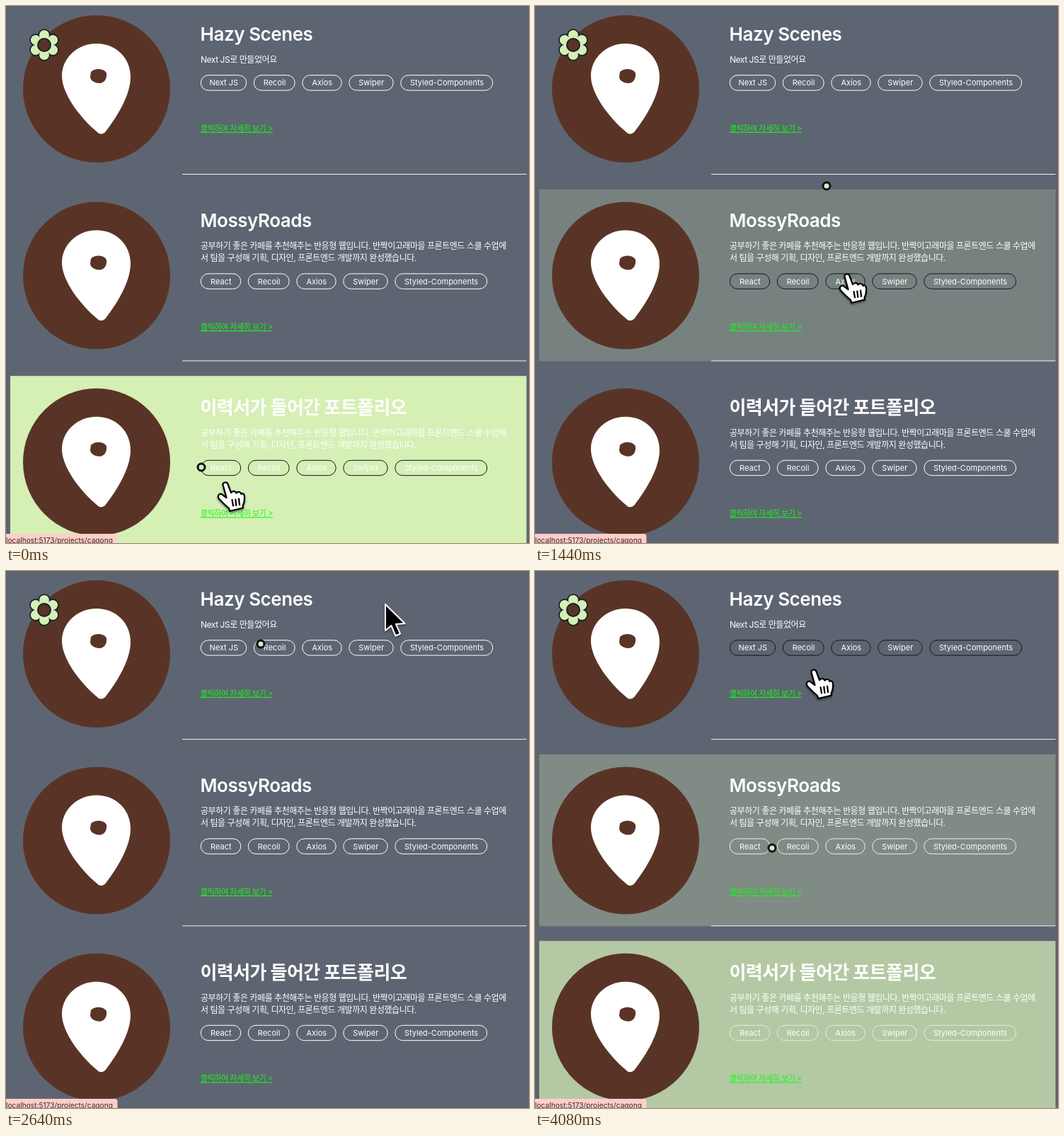
An HTML page that plays this animation: 739 by 758 pixels, repeating every 4.16 s.

```html
<!DOCTYPE html>
<html lang="ko">
<head>
<meta charset="utf-8">
<title>Projects</title>
<style>
  html, body { margin: 0; width: 100%; height: 100%; overflow: hidden; background: #5e6572; }
  svg { display: block; width: 100%; height: 100%; }
  text { font-family: Inter, "Noto Sans CJK KR", "Noto Sans CJK", sans-serif; fill: #fff; white-space: pre; }
  .title { font-size: 26px; font-weight: 600; letter-spacing: -.45px; }
  .title.ko { font-weight: 700; letter-spacing: -.55px; }
  .desc { font-size: 12px; letter-spacing: -.45px; }
  .tag { font-size: 11px; text-anchor: middle; }
  .link { font-size: 11px; letter-spacing: -.45px; fill: #16f816; text-decoration: underline; }
  .status { font-size: 10.2px; fill: #40292a; }
</style>
</head>
<body>
<svg viewBox="0 0 739 758">
  <defs>
    <filter id="shadow" x="-30%" y="-30%" width="170%" height="170%">
      <feDropShadow dx="0" dy="2" stdDeviation="1.5" flood-opacity=".45"/>
    </filter>
    <g id="badge">
      <circle cx="128" cy="117" r="104" fill="#593426"/>
      <path fill="#fff" d="M128 53C100 53 79 74 79 99C79 124 105 158 129 178C133 182 138 181 141 177C158 155 176 125 176 100C176 73 155 53 128 53Z"/>
      <path fill="#593426" d="M120 93C126 87 139 88 142 95C143 102 139 109 132 109C127 109 119 106 119 100Z"/>
    </g>
  </defs>
  <rect width="739" height="758" fill="#5e6572"/>
  <g id="rows"></g>
  <g id="flower" transform="translate(54 55)"></g>
  <path d="M0 745H153.500Q157.500 745 157.500 749V758H0Z" fill="#fdcfcb"/>
  <text class="status" x="0" y="757.500">localhost:5173/projects/cagong</text>
  <circle id="follower" r="5" fill="#d5efb5" stroke="#0b1016" stroke-width="3"/>
  <g id="hand" filter="url(#shadow)" stroke="#000" stroke-width="2.200" stroke-linejoin="round" stroke-linecap="round">
    <path fill="#fff" d="M-3.500 3C-4-1 2-2 3.500 2L8 14C10 11 14 11 15.500 14.500C18 11.500 22 13 22.500 16C25 14 27 16 27 20C27.500 27 26 30 24.500 33L25 35.500L6 40L5 36C0 32-4 28-9.500 22C-12 17-7 14-4 17L1.500 21Z"/>
    <path fill="none" d="M9.500 24L11 32.500M14.300 23.500L15.300 32M19 22.500L20 31"/>
  </g>
  <path id="arrow" filter="url(#shadow)" fill="#000" stroke="#fff" stroke-width="2" stroke-linejoin="round"
    d="M0 1V38L8.500 31L14.500 45.500L21 42.500L15 29L27.500 28Z"/>
</svg>
<script>
const LOOP = 4160, STEP = 80, FADE = 500;
const SAMPLE = 40;  // pointer polling interval
const LAG = 60;     // the ring trails the pointer
const PITCH = 263.4, LINE = 16.8;
const NS = 'http://www.w3.org/2000/svg';
const byId = id => document.getElementById(id);

function add(parent, tag, attrs, content) {
  const node = document.createElementNS(NS, tag);
  for (const key in attrs) node.setAttribute(key, attrs[key]);
  if (content) node.textContent = content;
  return parent.appendChild(node);
}

const LONG_DESC = [
  '공부하기 좋은 카페를 추천해주는 반응형 웹입니다. 반짝이고래마을 프론트엔드 스쿨 수업에',
  '서 팀을 구성해 기획, 디자인, 프론트엔드 개발까지 완성했습니다.'
];
const TAG_WIDTH = { 'Next JS': 65, React: 57, Recoil: 58.5, Axios: 56, Swiper: 63, 'Styled-Components': 130.5 };
const COMMON_TAGS = ['Recoil', 'Axios', 'Swiper', 'Styled-Components'];
const ROWS = [
  { title: 'Hazy Scenes', desc: ['Next JS로 만들었어요'], first: 'Next JS', plain: true },
  { title: 'MossyRoads', desc: LONG_DESC, first: 'React' },
  { title: '이력서가 들어간 포트폴리오', ko: true, desc: LONG_DESC, first: 'React' }
];

function buildRow(row, i) {
  const g = add(byId('rows'), 'g', { transform: `translate(0 ${i * PITCH})` });
  if (!row.plain) row.card = add(g, 'rect', { x: 6, y: -4.6, width: 729.5, height: 242.6, fill: '#d5efb5' });
  add(g, 'use', { href: '#badge' });
  add(g, 'rect', { x: 249, y: 237, width: 486.5, height: 1, fill: '#eef0f0' });
  add(g, 'text', { class: row.ko ? 'title ko' : 'title', x: 274.5, y: 48.8 }, row.title);
  row.desc.forEach((line, n) => add(g, 'text', { class: 'desc', x: 275, y: 80 + n * LINE }, line));
  const shift = (row.desc.length - 1) * LINE;
  row.tags = add(g, 'g', { transform: `translate(0 ${shift})`, fill: 'none' });
  let x = 275.3;
  for (const name of [row.first, ...COMMON_TAGS]) {
    const width = TAG_WIDTH[name];
    add(row.tags, 'rect', { x, y: 97.7, width: width - .6, height: 21.4, rx: 10.7 });
    add(row.tags, 'text', { class: 'tag', x: x + width / 2, y: 112.4, stroke: 'none' }, name);
    x += width + 10;
  }
  add(g, 'text', { class: 'link', x: 275, y: 176.8 + shift }, '클릭하여 자세히 보기 >');
}

function buildFlower() {
  const flower = byId('flower');
  const petals = (r, fill) => {
    for (let i = 0; i < 6; i++) {
      add(flower, 'circle', { r, fill, cy: 14, transform: `rotate(${i * 60})` });
    }
  };
  petals(8.7, '#14202b');
  petals(7, '#d5efb5');
  add(flower, 'circle', { r: 12.5, fill: '#d5efb5' });
  add(flower, 'circle', { r: 9, fill: '#593426', stroke: '#14202b', 'stroke-width': 2 });
}

// CSS "ease" timing curve
function ease(p) {
  if (p >= 1) return 1;
  const bezier = (u, a, b) => 3 * u * (1 - u) ** 2 * a + 3 * u * u * (1 - u) * b + u ** 3;
  let lo = 0, hi = 1;
  for (let i = 0; i < 20; i++) {
    const mid = (lo + hi) / 2;
    if (bezier(mid, .25, .25) < p) lo = mid; else hi = mid;
  }
  return bezier(lo, .1, 1);
}

// turning points of the pointer: time, x, y
const PATH = [
  [-LAG, 276, 651], [0, 310, 673], [280, 375, 505], [500, 446, 433], [560, 486, 432],
  [900, 480, 131], [1380, 412, 254], [1440, 441, 379], [1780, 419, 298], [1840, 465, 222],
  [2580, 360, 103], [2640, 536, 46], [3780, 298, 476], [3840, 317, 595],
  [4000, 330, 560], [4020, 335, 391], [4080, 394, 140]
];

function pointer(t) {
  const n = Math.max(1, PATH.findIndex(point => point[0] >= t));
  const [t0, x0, y0] = PATH[n - 1], [t1, x1, y1] = PATH[n];
  const p = (t - t0) / (t1 - t0);
  return { x: x0 + (x1 - x0) * p, y: y0 + (y1 - y0) * p };
}

const overLink = ({ y }) => y > 60;
const rowUnder = point => overLink(point) ? Math.floor((point.y + 16) / PITCH) : -1;
const level = (fade, t) => fade.from + (fade.to - fade.from) * ease((t - fade.start) / FADE);

// replay the hover changes; the last row starts fully lit
function fadesAt(t) {
  const fades = ROWS.map((_, i) => ({ from: 0, to: i === ROWS.length - 1 ? 1 : 0, start: -FADE }));
  for (let s = 0; s <= t; s += SAMPLE) {
    const current = rowUnder(pointer(s));
    fades.forEach((fade, i) => {
      const to = i === current ? 1 : 0;
      if (to !== fade.to) Object.assign(fade, { from: level(fade, s), to, start: s });
    });
  }
  return fades;
}

function place(id, { x, y }, visible = true) {
  byId(id).setAttribute('transform', `translate(${x} ${y})`);
  byId(id).setAttribute('visibility', visible ? 'visible' : 'hidden');
}

function draw(time) {
  const t = Math.floor(time % LOOP / STEP) * STEP;
  const fades = fadesAt(t);
  ROWS.forEach((row, i) => {
    const hovered = fades[i].to === 1, lit = level(fades[i], t);
    row.tags.setAttribute('stroke', hovered ? '#10161d' : '#fff');
    row.tags.setAttribute('stroke-opacity', hovered || row.plain ? 1 : 1 - .5 * lit);
    if (row.card) row.card.setAttribute('opacity', lit);
  });
  const tip = pointer(t);
  place('follower', pointer(t - LAG));
  place('hand', tip, overLink(tip));
  place('arrow', tip, !overLink(tip));
}

ROWS.forEach(buildRow);
buildFlower();
const begin = performance.now();
function tick() {
  draw(performance.now() - begin);
  requestAnimationFrame(tick);
}
tick();
</script>
</body>
</html>
```
